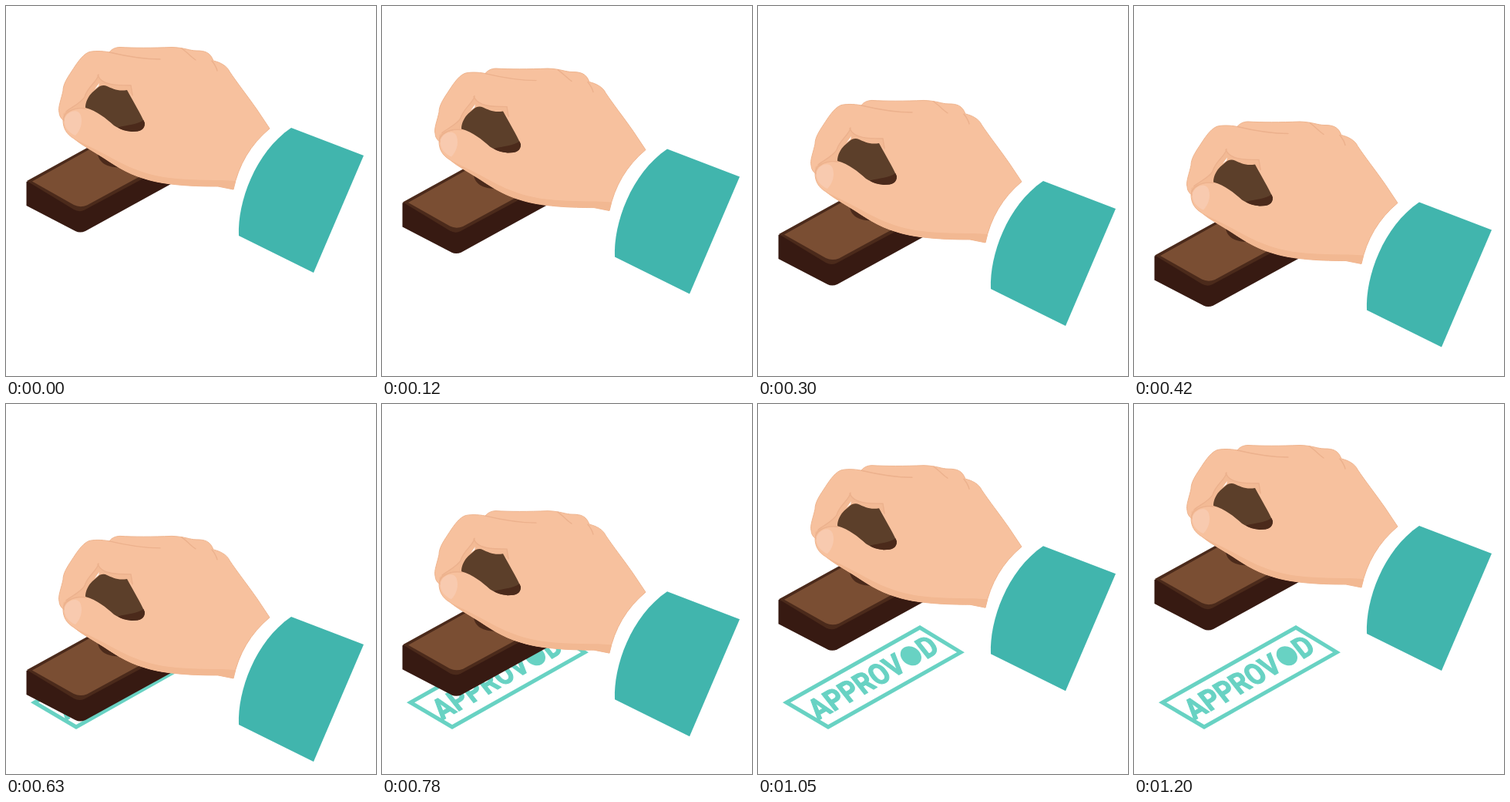
An HTML page that plays this animation: 480 px wide and 480 px high, repeating every 1.5 s.

```html
<!DOCTYPE html>
<html lang="en">
<head>
<meta charset="utf-8">
<title>Rubber stamp</title>
<style>
  html, body { margin: 0; height: 100%; overflow: hidden; background: #fff; }
  svg { display: block; width: 100%; height: 100%; }
  text { font: 700 34px Roboto, Arial, sans-serif; stroke: #68d2c3; stroke-width: 1; }
  .crease { fill: none; stroke: #ecb18d; stroke-width: 1.4; stroke-linecap: round; }
</style>
</head>
<body>
<svg viewBox="0 0 480 480">
  <g id="print" fill="#68d2c3" visibility="hidden">
    <path d="M37 387.2 210 290 263 322.2 91 419Z" fill="none" stroke="#68d2c3" stroke-width="5"/>
    <g transform="matrix(.872 -.492 .723 .91 78 410.5)">
      <text>APPROV</text>
      <circle cx="148" cy="-12" r="12"/>
      <text x="161">D</text>
    </g>
  </g>

  <g id="hand">
    <!-- stamp block -->
    <path fill="#371a12" d="M26.500 228V259L90 292Q96 295 103 292L232 221 150 190Z"/>
    <path fill="#4b2a1b" d="M27 227 107 183 200 212 102 264.500Q95 268 88 264Z"/>
    <path fill="#7a4e33" d="M34 227.500 110 185 185 215 105 258.500Q96 262 88 258Z"/>
    <path fill="#4b2a1b" d="M119 190C119 201 128 209 146 209.500L150 200Z"/>

    <!-- hand -->
    <path fill="#f7c19e" stroke="#efb58f" d="M342 159 326 135C312 115 300 100 290 85 287 78 278 73 269 71 265 60 258 58 247 58 238 58 232 54 215 53.500 190 54.500 165 54.500 148 53.500 142 53.500 137 56 134 60 125 58 112 58 107 60 98 64 91 76 85 85 79 94 74 102 74 110 72 120 67 132 69 138 69 143 72 146 74 148 74 158 78 166 88 172 99 181 111 187 122 194 138 204 155 217 180 224 210 234 260 234 275 234L295 238Q305 190 342 159Z"/>
    <path fill="#f2b892" d="M88 172C99 181 111 187 122 194 138 204 155 217 180 224 210 234 260 234 275 234L295 238 298 227C275 225 245 227 212 223 170 218 145 201 118 187Z"/>
    <path fill="#f3ba95" d="M120 89C119 98 106 104 102 118 97 126 87 130 74 140L76 146C82 134 95 131 105 134L125 112 157 112 165 116 162 103C144 103 124 103 120 89Z"/>
    <path class="crease" d="M134 60C155 65 175 69 200 69M228 55C235 60 240 66 246 70M267 71C271 76 273 80 274 84M120 89C119 98 106 104 102 118 97 126 87 130 78 137M119 90C124 103 144 103 162 103L164 116"/>

    <!-- grip between the fingers -->
    <path fill="#5c3f2a" d="M103 132C103 124 107 117 112 112L119 106C122 103 127 102 131 104 138 107 145 111 157 109 165 124 174 138 180 152 180 160 175 163 163 163 155 162 148 160 140 155 130 146 118 136 103 132Z"/>
    <path fill="#4b2a1b" d="M145 157.500C158 154 170 154 178.500 148L180 152C180 160 175 163 163 163 155 162 150 161 145 157.500Z"/>
    <path fill="#fff" d="M121 100 115 108 120 104Z"/>
    <path class="crease" d="M75 149C72 139 87 131 103 133"/>
    <path fill="#f8caaf" d="M76 146C79 136 94 132 97 142 100 152 96 162 90 168 82 165 74 157 76 146Z"/>

    <path fill="#41b5ad" d="M370 158 464 194 399 346 302 298C300 255 323 190 370 158Z"/>
  </g>
</svg>
<script>
  const LOOP = 1500, STEP = 30, PRESS = 570, LIFTED = 1170, DEPTH = 131;
  const hand = document.getElementById('hand');
  const print = document.getElementById('print');

  function draw(now) {
    const t = Math.floor((now % LOOP) / STEP) * STEP;
    const down = t < PRESS
      ? t / PRESS
      : Math.max(0, (LIFTED - t) / (LIFTED - PRESS));
    hand.setAttribute('transform', `translate(0 ${DEPTH * down})`);
    print.setAttribute('visibility', t < PRESS ? 'hidden' : 'visible');
  }

  function tick() {
    draw(performance.now() - start);
    requestAnimationFrame(tick);
  }

  const start = performance.now();
  tick();
</script>
</body>
</html>
```
